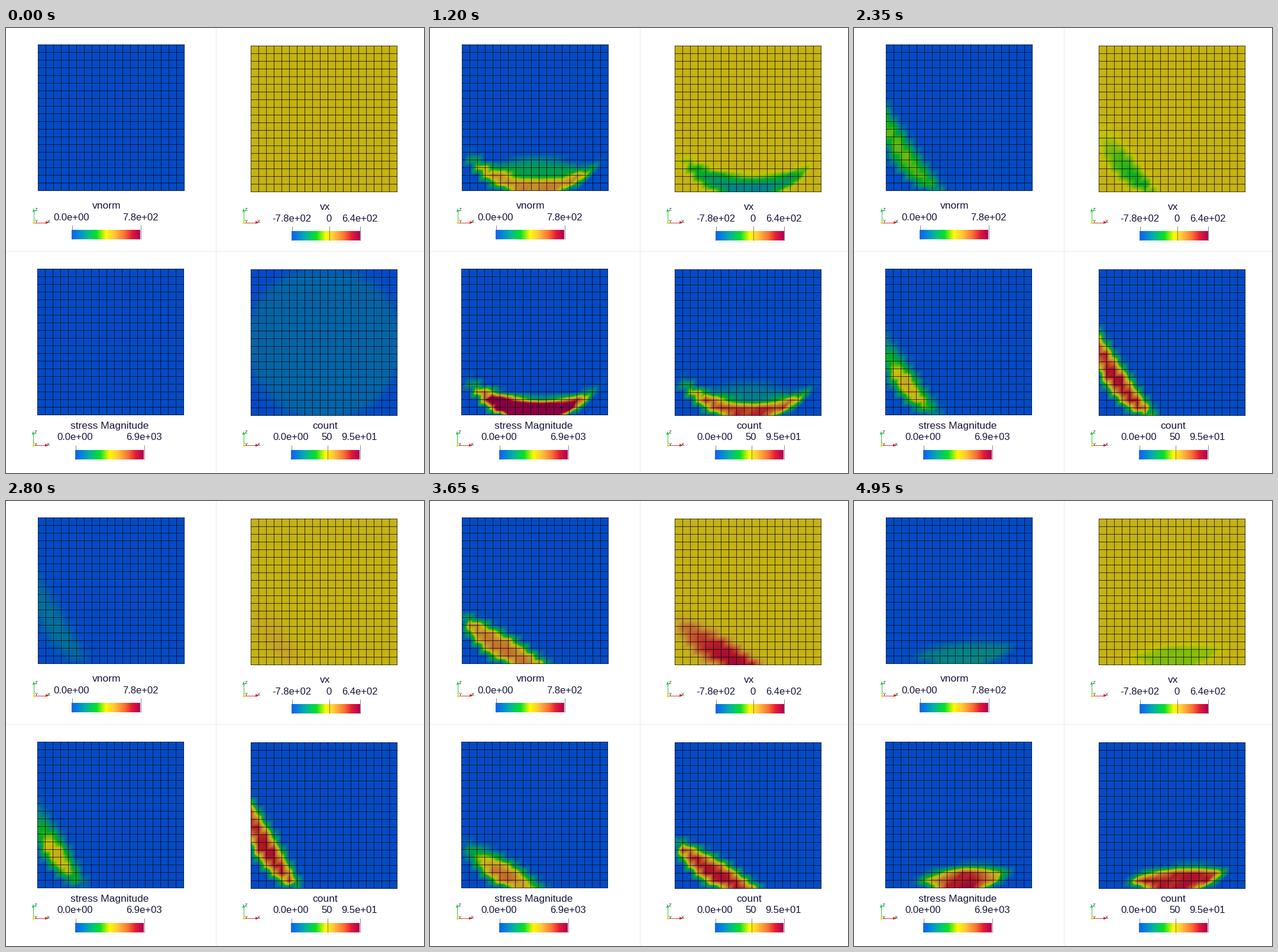
Animation of 707 by 754 pixels, one loop 5 s. Source, as a matplotlib script:

```python
import numpy as np
import matplotlib.pyplot as plt
from matplotlib.animation import FuncAnimation
from matplotlib.colors import LinearSegmentedColormap

W, H, DPI = 707, 754, 100
FRAMES, INTERVAL = 100, 50
SIDE, CELLS = 248, 19
R = SIDE / 2              # drum radius in pixels
V_MAX, VX_MIN, VX_MAX = 780, -780, 640
LANDING, TURN, HALF_SWING = 1.2, 2.7, 2.05    # seconds
INK = "#14143a"

plt.rcParams["font.family"] = "Liberation Sans"

STOPS = [(0, "#0561ff"), (.2, "#05b0a5"), (.36, "#05e128"), (.5, "#fffa00"),
         (.62, "#ffc83c"), (.78, "#fa6e34"), (.88, "#e61e34"), (1, "#b00056")]
BAR_MAP = LinearSegmentedColormap.from_list("rainbow", STOPS, N=512)
FIELD_MAP = LinearSegmentedColormap.from_list(
    "shaded", BAR_MAP(np.linspace(0, 1, 512))[:, :3] * .78, N=512)

# Grid nodes relative to the drum centre, y pointing down
axis = np.linspace(-R, R, CELLS + 1)
X, Y = np.meshgrid(axis, axis)
RADIUS = np.hypot(X, Y)
ANGLE = np.arctan2(-X, Y)
WALL = np.clip((R + 13 - RADIUS) / 11, 0, 1)
GRAIN = 1 - .1 * np.random.default_rng(4).random(X.shape)

# Cell index and position inside the cell for every pixel
pixels = (np.arange(SIDE) + .5) / SIDE * CELLS
cell = pixels.astype(int)
ROW, COL = np.ix_(cell, cell)
FY, FX = np.ix_(pixels - cell, pixels - cell)


def spread(nodes):
    """Interpolate node values over two triangles per cell."""
    a, b = nodes[ROW, COL], nodes[ROW, COL + 1]
    c, d = nodes[ROW + 1, COL], nodes[ROW + 1, COL + 1]
    upper = a + FX * (b - a) + FY * (c - a)
    lower = d + (1 - FX) * (c - d) + (1 - FY) * (b - d)
    return np.where(FX + FY < 1, upper, lower)


def fields(t):
    """Node values of the four panels, scaled to 0..1."""
    s = min(t / 1.4, 1)
    settle = s * s * (3 - 2 * s)

    # the landed pile sloshes like a damped pendulum
    phase = np.pi * (max(t, LANDING) - TURN) / HALF_SWING
    lean = np.radians(27 + 33.5 * np.cos(phase))
    speed = 900 * np.exp(-.12 * t) * np.sin(phase) * settle
    half = np.radians(36 + 49 * np.exp(-t / .95))
    thick = 33.5 * (1 - np.exp(-t / 1.2))
    impact = 1.1 * np.exp(-((t - LANDING) / .35) ** 2)
    load = (.8 - .2 * np.cos(phase) + impact) * settle

    # crescent between the drum wall and a curved free surface
    down = -X * np.sin(lean) + Y * np.cos(lean)
    along = X * np.cos(lean) + Y * np.sin(lean)
    crown = R - thick
    surface = crown + (R * np.cos(half) - crown) * (along / (R * np.sin(half))) ** 2
    pile = np.clip((down - surface + 8) / 16, 0, 1) * WALL

    # the rest of the disc, still in free fall
    front = -R + 135 * t * t + X ** 2 / (3 * R)
    fall = np.clip((Y - front + 8) / 14, 0, 1) * WALL
    moving = np.clip(1.2 * pile, 0, 1) * GRAIN

    vnorm = np.maximum(moving * abs(speed), fall * 185 * min(t, LANDING)) / V_MAX
    vx = (moving * speed * np.cos(ANGLE) - VX_MIN) / (VX_MAX - VX_MIN)
    focus = np.exp(-((ANGLE - lean * .85) / (half * 1.1)) ** 2)
    stress = load * pile * GRAIN * focus * (.7 + .3 * RADIUS / R)
    count = np.maximum(.93 * settle * pile * GRAIN, (.085 + .06 * t) * fall)
    return vnorm, vx, stress, count


fig = plt.figure(figsize=(W / DPI, H / DPI), dpi=DPI, facecolor="white")
ax = fig.add_axes([0, 0, 1, 1])
ax.axis("off")


def px(n):
    return n * 72 / DPI


def line(xs, ys, color, width=1.0, **kw):
    ax.plot(xs, ys, color=color, lw=px(width), solid_capstyle="butt", **kw)


def label(x, baseline, text, size, color=INK):
    ax.text(x, baseline, text, size=px(size), color=color, ha="center",
            va="baseline")


def draw_field(x, y):
    image = ax.imshow(np.zeros((SIDE, SIDE)), cmap=FIELD_MAP, vmin=0, vmax=1,
                      extent=(x, x + SIDE, y + SIDE, y), aspect="auto",
                      interpolation="nearest", zorder=1)
    ticks = np.linspace(.4, SIDE - .4, CELLS + 1)
    style = dict(colors="#05080c", lw=px(1), alpha=.75, zorder=2, snap=False)
    ax.vlines(x + ticks, y, y + SIDE, **style)
    ax.hlines(y + ticks, x, x + SIDE, **style)
    return image


def draw_legend(x, y, title, title_x, marks):
    """Colour bar with its title and (offset, text) marks."""
    ax.imshow(np.linspace(0, 1, 116)[None], cmap=BAR_MAP, vmin=0, vmax=1,
              extent=(x, x + 116, y + 16, y), aspect="auto",
              interpolation="nearest", zorder=1)
    for offset, text in marks:
        tick = x + offset + .5
        line([tick, tick], [y - 8, y + 16], "#66667a", .8, zorder=2)
        label(x + offset, y - 16.5, text, 16.6)
    label(title_x, y - 36, title, 17.4)


def draw_triad(x, y):
    line([x, x], [y, y - 19], "#35c435")
    line([x, x + 21], [y, y], "#d04040")
    ax.fill([x - 2.5, x + 2.5, x], [y - 18, y - 18, y - 24], "#18d850", lw=0)
    ax.fill([x + 20, x + 20, x + 26], [y - 2.5, y + 2.5, y], "#e02020", lw=0)
    ax.plot([x], [y], "o", color="#e8e020", ms=px(4), mew=0)
    for dx, dy, name in [(4, -20, "Z"), (4, 1, "Y"), (25, 1, "X")]:
        label(x + dx, y + dy, name, 7.5, "#222222")


line([354.5, 354.5], [0, H], "#ebebeb")
line([0, W], [377.5, 377.5], "#ebebeb")

images = [draw_field(x, y) for x, y in
          [(54, 28), (414, 30), (53, 408), (414, 409)]]

draw_legend(111, 342, "vnorm", 170, [(0, "0.0e+00"), (116, "7.8e+02")])
draw_legend(483, 344, "vx", 540,
            [(0, "-7.8e+02"), (63, "0"), (115.5, "6.4e+02")])
draw_legend(117, 715, "stress Magnitude", 175,
            [(0, "0.0e+00"), (116, "6.9e+03")])
draw_legend(482, 715, "count", 540,
            [(0, "0.0e+00"), (61, "50"), (116, "9.5e+01")])

for corner in [(47, 329.5), (402, 329.5), (46, 707), (402, 707)]:
    draw_triad(*corner)

ax.set_xlim(0, W)
ax.set_ylim(H, 0)


def update(frame):
    for image, nodes in zip(images, fields(frame * INTERVAL / 1000)):
        image.set_data(spread(nodes))
    return images


anim = FuncAnimation(fig, update, frames=FRAMES, interval=INTERVAL,
                     repeat=True, repeat_delay=0, blit=False)
plt.show()
```
